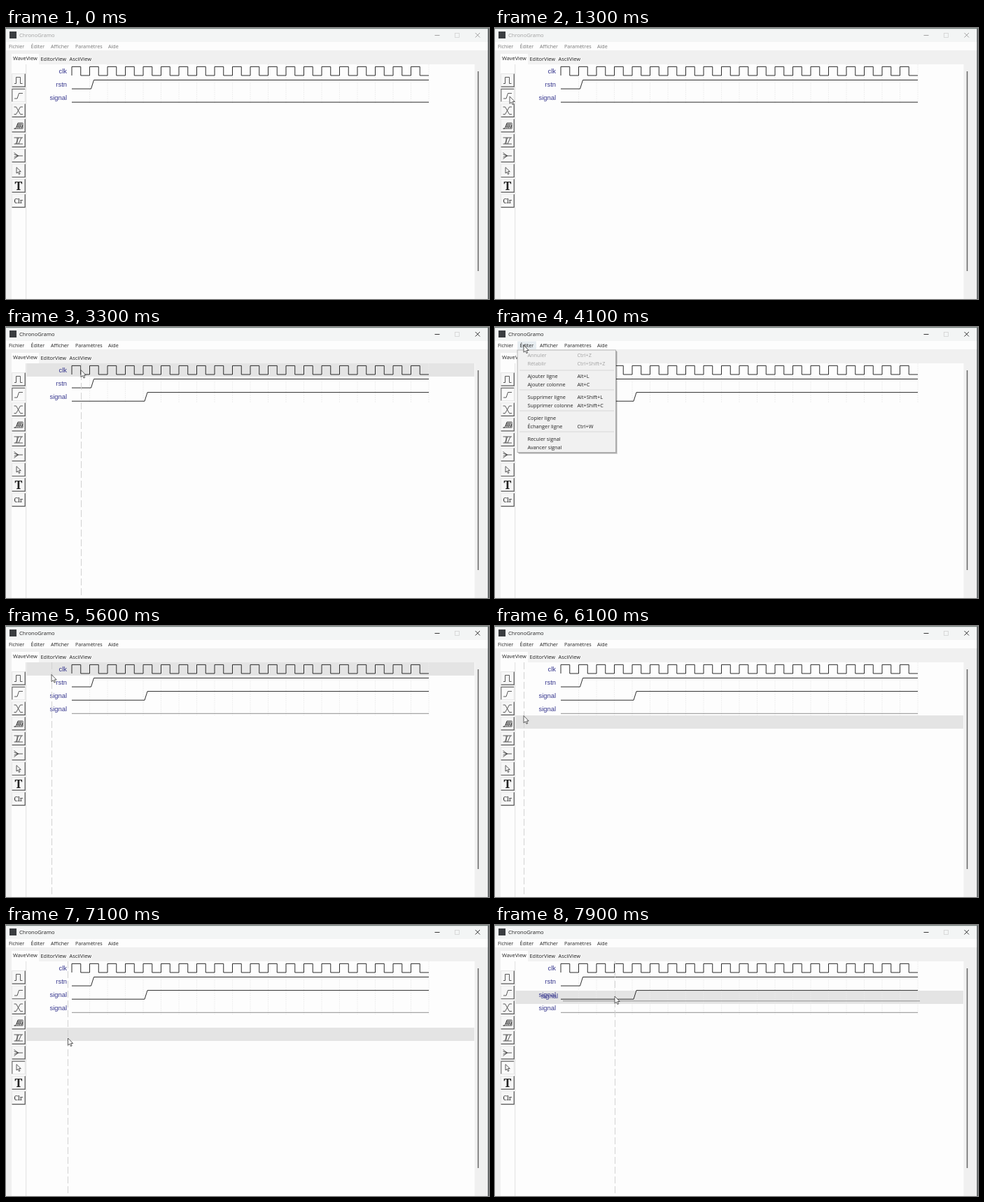
These frames come from a looping animation (690 px wide and 388 px high, 8 s). An HTML page:

```html
<!DOCTYPE html>
<html lang="fr">
<head>
<meta charset="utf-8">
<style>
html, body { margin: 0; width: 100%; height: 100%; overflow: hidden; background: #f0f0f0; }
svg { display: block; width: 690px; height: 388px; }
text { font-family: "Open Sans", "Noto Sans", sans-serif; font-size: 7.2px; fill: #222; white-space: pre; }
.label { font: 9.4px "Liberation Sans", Arial, sans-serif; fill: #34348c; text-anchor: end; }
.serif { font-family: "Noto Serif", serif; text-anchor: middle; }
.wave { fill: none; stroke: #222; stroke-width: .95; }
.thin { stroke: #8c8c8c; }
.icon { fill: none; stroke: #333; stroke-width: .8; }
</style>
</head>
<body>
<svg id="stage" viewBox="0 0 690 388"></svg>
<script>
const LOOP = 8000, STEP = 100;
const TOP = 52, ROW = 19.1, LEFT = 94, COL = 25.5, COLS = 20;
const stage = document.getElementById('stage');

function add(parent, tag, attrs, content) {
  const el = document.createElementNS('http://www.w3.org/2000/svg', tag);
  for (const k in attrs) el.setAttribute(k, attrs[k]);
  if (content) el.textContent = content;
  parent.appendChild(el);
  return el;
}
const group = parent => add(parent, 'g', {});
const rect = (p, x, y, width, height, fill, more) => add(p, 'rect', { x, y, width, height, fill, ...more });
const path = (p, d, more) => add(p, 'path', { d, fill: 'none', ...more });
const label = (p, x, y, s, more) => add(p, 'text', { x, y, ...more }, s);
const show = (el, on) => el.setAttribute('visibility', on ? 'visible' : 'hidden');

// Window
rect(stage, 0, 0, 690, 388, '#f0f0f0');
rect(stage, 0, 0, 690, 20, '#f3f5f5');
rect(stage, 0, 0, 690, 1.2, '#74807c');
rect(stage, 0, 20, 689, 12, '#fdfdfd');
rect(stage, 5, 5, 10, 10, '#3a3d40');
const title = label(stage, 19, 12.8, 'ChronoGramo', { style: 'font-size:7.6px' });
const menuHot = rect(stage, 32, 20.5, 27, 11.5, '#e7edf1');
const bar = group(stage);
[['Fichier', 4], ['Éditer', 35.5], ['Afficher', 64], ['Paramètres', 99], ['Aide', 146]]
  .forEach(([s, x]) => label(bar, x, 29, s));
const buttons = path(stage, 'M612.5 10.5h7M670.5 7l6.5 6.5M677 7l-6.5 6.5', { 'stroke-width': .9 });
rect(stage, 641.5, 7.5, 6, 6, 'none', { stroke: '#d3d3d3', 'stroke-width': .8 });

rect(stage, 8, 37, 39, 16, '#fdfdfd');
rect(stage, 47, 39.5, 76, 12, '#f3f3f3');
[['WaveView', 10, 46], ['EditorView', 49.5, 47.2], ['AsciiView', 90.5, 47.2]]
  .forEach(([s, x, y]) => label(stage, x, y, s, { style: 'font-size:7.4px' }));
rect(stage, 8, TOP, 661.5, 336, '#fdfdfd');
rect(stage, 28, TOP, 1.2, 336, '#e6e6e6');
rect(stage, 673.8, 62, 1.5, 286, '#666');
rect(stage, 688.4, 1, 1.6, 387, '#55595a');

// Toolbar
const icons = [
  'M12 79.5h2.5v-9h6v9h3',
  'M12 101h4l2.5 -7.500h5.500',
  'M11.500 113h3l6 10.500h3.500M11.500 123.500h3l6 -10.500h3.500',
  'M11.500 144h2.500l3 -8h7v8zM15 142l3 -6M16.500 144l3.500 -8M19 144l3 -8M21.500 144l2.500 -5M16 139h8M15 141.500h9',
  'M11.500 157h12.500M11.500 166h12.500M14 166l4 -9M18 166l4 -9M16 157v9',
  'M11.500 178.500l6 4.500l-6 4.500M11.500 181l6 2M11.500 185l6 -2h6.500',
  'M15 199.500v8.500l2 -1.800l1.500 3.300l1.500 -.700l-1.500 -3.200h2.800z'
];
const tools = [];
for (let i = 0; i < 9; i++) {
  const y = 65.5 + i * 21.55;
  rect(stage, 8.5, y, 19, 19, '#f6f6f6');
  const up = group(stage), down = group(stage);
  path(up, `M8.5 ${y + 18.7}h18.700v-18.700`, { stroke: '#555', 'stroke-width': 1.2 });
  path(up, `M8.5 ${y + 18}v-18h18`, { stroke: '#e3e3e3', 'stroke-width': .8 });
  rect(down, 8.5, y, 19, 19, '#fafafa');
  path(down, `M8.8 ${y + 18.5}v-18.200h18.500`, { stroke: '#666', 'stroke-width': 1.1 });
  path(down, `M9 ${y + 18.7}h18.300v-18`, { stroke: '#ddd', 'stroke-width': .8 });
  if (icons[i]) path(stage, icons[i], { class: 'icon' });
  tools.push({ up, down });
}
label(stage, 17.8, 232.2, 'T', { class: 'serif', style: 'font-size:16.5px;font-weight:600' });
label(stage, 17.8, 251.2, 'Clr', { class: 'serif', style: 'font-size:9px;font-weight:500' });

// Canvas
const band = rect(stage, 29.5, 0, 639.5, 19, '#e4e4e4');
function grid(p, y, h) {
  let d = '';
  for (let i = 1; i <= COLS; i++) d += `M${LEFT + i * COL} ${y}v${h}`;
  path(p, d, { stroke: '#eaeaea', 'stroke-width': .8, 'stroke-dasharray': '2 1' });
}
grid(stage, TOP, 57);
const low = r => TOP + r * ROW + 16;
const END = LEFT + COLS * COL;
const flat = r => `M${LEFT} ${low(r)}H${END}`;
const rise = (r, c) => `M${LEFT} ${low(r)}H${LEFT + c * COL + 2}l4 -12.600H${END}`;
const name = (p, r, s) => label(p, 87, TOP + r * ROW + 12.6, s, { class: 'label' });
const wave = (p, d, cls = 'wave') => path(p, d, { class: cls });

const half = COL / 2;
let clock = `M${LEFT} ${low(0)}`;
for (let i = 0; i < COLS; i++) clock += `v-12.600h${half}v12.600h${half}`;
wave(stage, clock);
name(stage, 0, 'clk');
wave(stage, rise(1, 1));
name(stage, 1, 'rstn');
const sig = wave(stage, '');
name(stage, 2, 'signal');

const extra = group(stage);
grid(extra, 109, 19);
wave(extra, flat(3), 'wave thin');
name(extra, 3, 'signal');
const ghost = group(stage);
wave(ghost, flat(3), 'wave thin');
name(ghost, 3, 'signal');

const guide = path(stage, `M0 ${TOP}V385`, { stroke: '#d2d2d2', 'stroke-width': 1, 'stroke-dasharray': '10 4' });

// Drop-down menu
const menu = group(stage);
rect(menu, 34, 35, 141, 147, '#000', { opacity: .14 });
rect(menu, 33, 34, 141, 147, '#000', { opacity: .22 });
rect(menu, 32, 33, 140.5, 146.5, '#f1f1f1', { stroke: '#a8a8a8', 'stroke-width': .8 });
const hot = rect(menu, 33.5, 0, 137.5, 12, '#91c9f7');
[62, 90, 120, 150].forEach(y => rect(menu, 35, y - .4, 135, .8, '#cfcfcf'));
const items = [
  ['Annuler', 'Ctrl+Z', 40], ['Rétablir', 'Ctrl+Shift+Z', 52],
  ['Ajouter ligne', 'Alt+L', 70], ['Ajouter colonne', 'Alt+C', 82],
  ['Supprimer ligne', 'Alt+Shift+L', 100], ['Supprimer colonne', 'Alt+Shift+C', 112],
  ['Copier ligne', '', 130], ['Échanger ligne', 'Ctrl+W', 142],
  ['Reculer signal', '', 160], ['Avancer signal', '', 172]
];
items.forEach(([s, key, y], i) => {
  const style = 'font-size:7.3px' + (i < 2 ? ';fill:#a2a2a2' : '');
  label(menu, 46.5, y + 2.6, s, { style });
  label(menu, 117.5, y + 2.6, key, { style });
});

const cursor = path(stage, 'M0 0V10.200L2.400 8.100L4 11.600L5.600 10.900L4.100 7.500H7.200Z',
  { fill: '#fff', stroke: '#333', 'stroke-width': .8, style: 'fill:#fff' });

// Pointer keys: time, x, y
const keys = [
  [0, 21, 98], [1300, 21, 98], [1600, 110, 101], [1900, 205, 98], [2100, 208, 98],
  [2600, 208, 98], [3100, 140, 70], [3500, 74, 53], [3800, 41, 26], [4400, 41, 26],
  [5100, 65, 69.5], [5600, 65, 69.5], [6100, 41, 128.5], [6400, 20, 185], [6600, 16, 201],
  [6800, 16, 201], [7100, 88.5, 162], [7300, 152, 118.5], [7600, 168, 118.5],
  [7700, 168, 118.5], [7800, 169, 112], [7900, 171, 102], [8000, 171, 102]
];
function pointer(t) {
  const i = keys.findIndex((k, n) => n && t <= k[0]);
  const [t0, x0, y0] = keys[i - 1], [t1, x1, y1] = keys[i];
  const u = (t - t0) / (t1 - t0);
  return [x0 + (x1 - x0) * u, y0 + (y1 - y0) * u];
}

function draw(t) {
  const [x, y] = pointer(t);
  const active = t >= 2300, open = t >= 3900 && t < 5300, drag = t >= 7800;
  title.style.fill = active ? '#222' : '#a0a0a0';
  bar.querySelectorAll('text').forEach(el => { el.style.fill = active ? '#222' : '#777'; });
  buttons.setAttribute('stroke', active ? '#222' : '#999');

  const tool = t >= 6600 ? 6 : 1;
  tools.forEach(({ up, down }, i) => {
    show(up, i !== tool);
    show(down, i === tool);
  });

  sig.setAttribute('d', t >= 2400 ? rise(2, 4) : flat(2));
  show(extra, t >= 5300);
  show(ghost, drag);
  const dx = x - 168, dy = y - 118.5;
  ghost.setAttribute('transform', `translate(${dx} ${dy})`);

  const inside = t >= 1300 && x > 29 && y > TOP && !open;
  const row = Math.floor((y - TOP) / ROW);
  show(band, inside);
  show(guide, inside);
  band.setAttribute('y', drag ? 110.5 + dy : TOP + row * 19);
  guide.setAttribute('transform', `translate(${Math.floor(x) + .5} 0)`);

  show(menu, open);
  show(menuHot, t >= 3800 && t < 5300);
  const item = items.find(m => Math.abs(y - m[2]) <= 6);
  const lit = open && item && items.indexOf(item) > 1;
  show(hot, lit);
  if (lit) hot.setAttribute('y', item[2] - 6);

  show(cursor, t >= 100);
  cursor.setAttribute('transform', `translate(${x} ${y})`);
}

const start = performance.now();
function tick(now) {
  const t = Math.max(0, now - start) % LOOP;
  draw(Math.floor(t / STEP) * STEP);
  requestAnimationFrame(tick);
}
draw(0);
requestAnimationFrame(tick);
</script>
</body>
</html>
```
